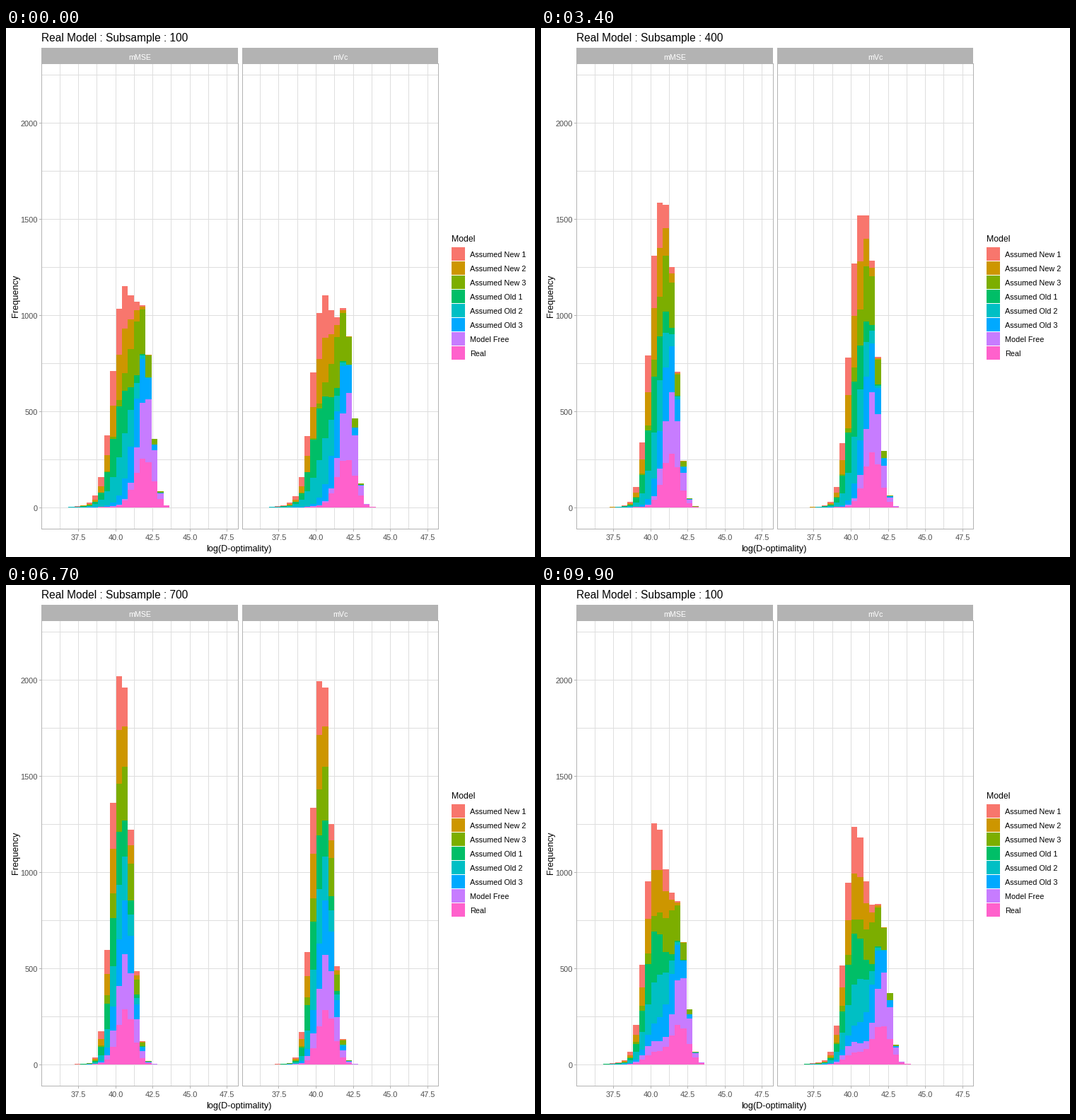
A matplotlib script for the animation above (10 s loop, 748 by 748 pixels).

```python
import numpy as np
import matplotlib.pyplot as plt
from matplotlib.animation import FuncAnimation
from matplotlib.collections import PolyCollection
from matplotlib.patches import Rectangle

SIZE, DPI = 748, 100
GRID, GREY, TEXT = "#DEDEDE", "#B3B3B3", "#4D4D4D"
TOP, BOTTOM, LEFT, RIGHT = 50, 708, 50.8, 328.0
PANEL_DX = 283.3
BASE, STEP = 678.3, 67.97            # zero line, pixels per 250 counts
BINS = np.arange(-1, 17)
BIN_X, BIN_W = 97.3, 8.39
SAMPLES = 1000

# name, colour, peak bin at the smallest and largest subsample,
# left and right spread at the smallest subsample
MODELS = [
    ("Assumed New 1", "#F8766D", 7.5, 6.55, 1.85, 1.35),
    ("Assumed New 2", "#CD9600", 7.7, 6.6, 1.75, 1.4),
    ("Assumed New 3", "#7CAE00", 10.3, 6.85, 1.5, 1.3),
    ("Assumed Old 1", "#00BE67", 7.2, 6.5, 1.5, 1.45),
    ("Assumed Old 2", "#00BFC4", 8.3, 6.65, 2.1, 1.2),
    ("Assumed Old 3", "#00A9FF", 10.5, 6.85, 1.8, 1.2),
    ("Model Free", "#C77CFF", 11.8, 6.9, 1.25, 1.0),
    ("Real", "#FF61CC", 11.5, 6.95, 1.65, 1.35),
]
SIZES = range(100, 1000, 100)
END_SPREAD = 1.46

# (first frame, number of steps) of every change of state
MOVES = [(6, 6), (18, 6)] + [(30 + 11 * i, 5) for i in range(7)]

plt.rcParams["font.family"] = "Liberation Sans"


def counts(model, t, panel):
    """Histogram of one model; t runs from 0 (smallest) to 1 (largest)."""
    _, _, start, end, left, right = model
    peak = start + (end - start) * t + 1.3 * t * (1 - t) ** 2
    if start > 10:
        peak += 0.25 * panel * (1 - t)

    def spread(s):
        return END_SPREAD + (s - END_SPREAD) * (1 - t) ** 2 - 0.1 * np.sin(np.pi * t)

    u = BINS - peak
    u = u / np.where(u < 0, spread(left), spread(right))
    tail = 0.06 * (1 - t) * np.exp(-u ** 2 / 8) * (u < 0)
    w = np.exp(-u ** 2 / 2) + tail
    return SAMPLES * w / w.sum()


def stack_tops(t):
    """Cumulative heights as (panel, model + 1, bin); row 0 is the full bar."""
    c = np.array([[counts(m, t, p) for m in MODELS] for p in range(2)])
    tops = np.cumsum(c[:, ::-1], axis=1)[:, ::-1]
    return np.concatenate([tops, np.zeros((2, 1, len(BINS)))], axis=1)


TOPS = [stack_tops((s - 100) / 800) for s in SIZES]

fig = plt.figure(figsize=(SIZE / DPI, SIZE / DPI), dpi=DPI, facecolor="white")
ax = fig.add_axes([0, 0, 1, 1])
ax.set(xlim=(0, SIZE), ylim=(SIZE, 0))
ax.axis("off")


def px(n):
    return n * 72 / DPI


def label(x, y, s, size, color="black", **kw):
    return ax.text(x, y, s, fontsize=px(size), color=color,
                   **{"va": "baseline", **kw})


def line(x0, y0, x1, y1, color, z=1):
    """One pixel wide line through pixel centres."""
    x0, y0, x1, y1 = np.floor([x0, y0, x1, y1]) + 0.5
    ax.plot([x0, x1], [y0, y1], color=color, lw=px(1), zorder=z, snap=False,
            solid_capstyle="projecting")


def box(x0, y0, x1, y1, color):
    x0, y0, x1, y1 = np.floor([x0, y0, x1, y1])
    ax.add_patch(Rectangle((x0, y0), x1 - x0, y1 - y0, fc=color, lw=0,
                           antialiased=False))


for p, name in enumerate(("mMSE", "mVc")):
    dx = p * PANEL_DX
    x0, x1 = LEFT + dx, RIGHT + dx
    for i in range(10):
        y = BASE - i * STEP
        line(x0, y, x1, y, GRID)
        x = 76.3 + i * 26.28 + dx
        line(x, TOP, x, BOTTOM, GRID)
        if i % 2:
            line(x, BOTTOM + 1, x, BOTTOM + 3, GREY)
            label(x, 723.5, f"{36.25 + 1.25 * i:.1f}", 11, TEXT, ha="center")
    for x in (x0, x1):
        line(x, TOP, x, BOTTOM, GREY, z=5)
    for y in (TOP, BOTTOM):
        line(x0, y, x1, y, GREY, z=5)
    box(x0, 28, x1, TOP, GREY)
    label((x0 + x1) / 2, 45, name, 10.6, "white", ha="center")

for i in range(5):
    y = BASE - 2 * i * STEP
    line(LEFT - 3, y, LEFT - 1, y, GREY)
    label(45, y + 4.7, str(500 * i), 11, TEXT, ha="right")

label(329, 740, "log(D-optimality)", 12.6, ha="center")
label(14, 379, "Frequency", 12.7, ha="center", va="center", rotation=90)
title = label(50, 19, "", 15.5)

label(630, 302, "Model", 12.3)
for i, (name, color, *_) in enumerate(MODELS):
    y = 310 + 20 * i
    box(630, y, 649, y + 19, color)
    label(656, y + 14.4, name, 10.9)

bars = [ax.add_collection(PolyCollection([], facecolors=m[1], edgecolors="none",
                                         linewidths=0, antialiaseds=False, zorder=3),
                          autolim=False) for m in MODELS]
EDGES = BIN_X + BIN_W * BINS + PANEL_DX * np.arange(2)[:, None]
X0, X1 = np.floor(EDGES), np.floor(EDGES + BIN_W)


def pose(frame):
    """Stack heights and title value at a frame."""
    tops, size = TOPS[0], SIZES[0]
    for s, (start, steps) in enumerate(MOVES):
        k = min(frame - start + 1, steps)
        if k < 1:
            break
        nxt = (s + 1) % len(SIZES)
        tops = TOPS[s] + (TOPS[nxt] - TOPS[s]) * k / steps
        size = SIZES[nxt] if 2 * k > steps else SIZES[s]
    return tops, size


def update(frame):
    tops, size = pose(frame)
    y = np.floor(BASE - tops * STEP / 250)
    for m, coll in enumerate(bars):
        hi, lo = y[:, m], y[:, m + 1]
        corners = [(X0, lo), (X0, hi), (X1, hi), (X1, lo)]
        verts = np.stack([np.stack(c, axis=-1) for c in corners], axis=2)
        coll.set_verts(verts.reshape(-1, 4, 2))
    title.set_text(f"Real Model : Subsample : {size}")
    return [*bars, title]


anim = FuncAnimation(fig, update, frames=100, interval=100, repeat=True,
                     repeat_delay=0, blit=False)
plt.show()
```
